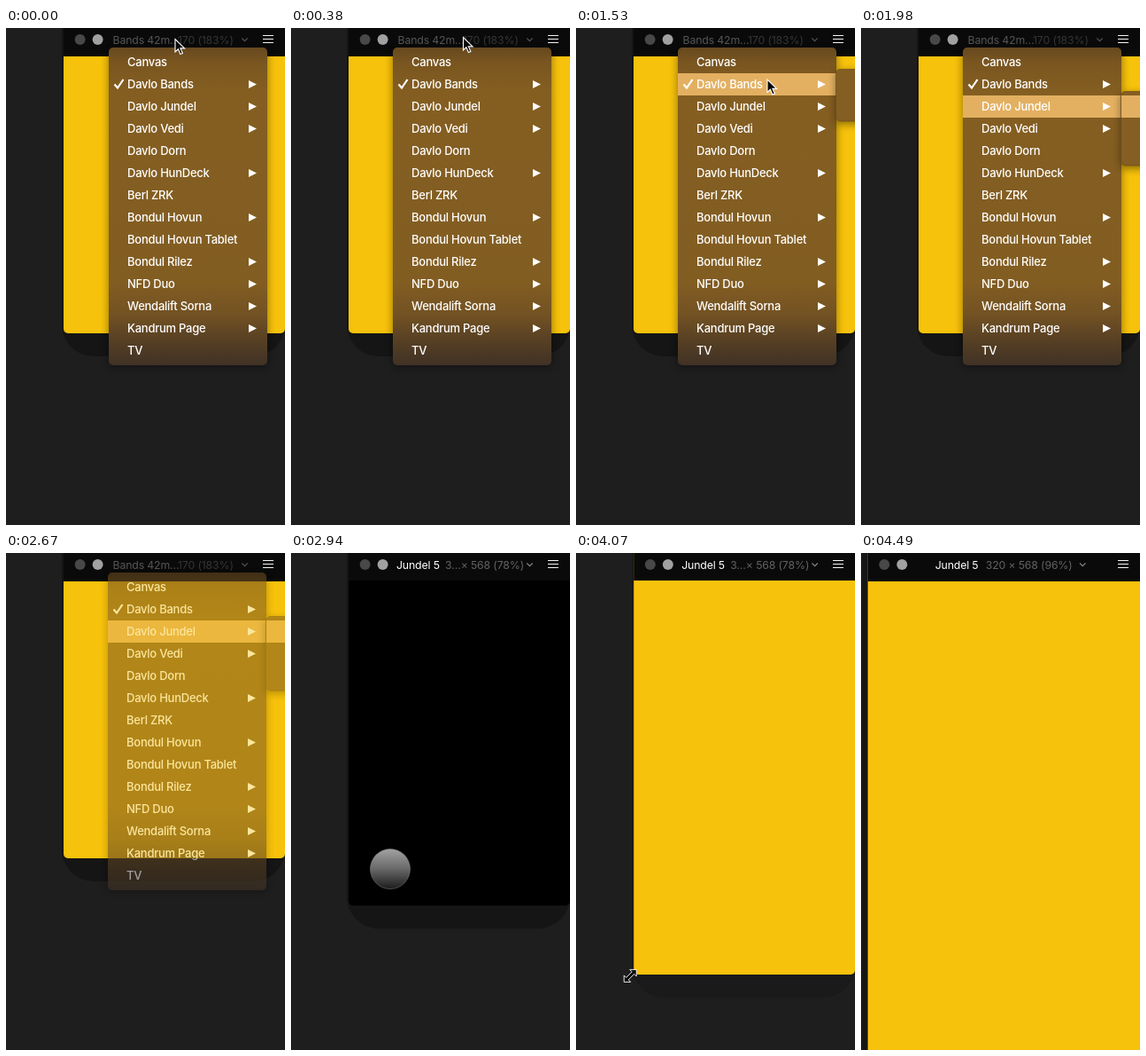
An HTML page that plays this animation: 315x560 px, repeating every 4.82 s.

```html
<!DOCTYPE html>
<html lang="en">
<head>
<meta charset="utf-8">
<title>Device menu</title>
<style>
  html, body { margin: 0; width: 100%; height: 100%; overflow: hidden; background: #1e1e1e; }
  svg { display: block; width: 100%; height: 100%; }
  text { font-family: Inter, Roboto, sans-serif; white-space: pre; }
  .item { font-size: 13px; font-weight: 500; letter-spacing: -.25px; fill: #fff; }
  .head { font-size: 12.3px; letter-spacing: -.15px; }
</style>
</head>
<body>
<svg viewBox="0 0 315 560">
  <defs>
    <linearGradient id="glass" gradientUnits="userSpaceOnUse" x1="0" y1="22" x2="0" y2="380">
      <stop offset="0" stop-color="#67491f"/>
      <stop offset=".05" stop-color="#7a5620"/>
      <stop offset=".14" stop-color="#845e21"/>
      <stop offset=".74" stop-color="#825d22"/>
      <stop offset=".84" stop-color="#735223"/>
      <stop offset=".92" stop-color="#574024"/>
      <stop offset="1" stop-color="#403225"/>
    </linearGradient>
    <linearGradient id="ball" x1="0" y1="0" x2="0" y2="1">
      <stop offset="0" stop-color="#a2a2a2"/>
      <stop offset=".5" stop-color="#686868"/>
      <stop offset="1" stop-color="#1c1c1c"/>
    </linearGradient>
    <filter id="blur" x="-20%" y="-20%" width="140%" height="140%"><feGaussianBlur stdDeviation="4"/></filter>
  </defs>

  <rect width="315" height="560" fill="#1e1e1e"/>
  <rect id="shade" y="-60" rx="36" fill="#141414"/>
  <rect id="page" y="-20" rx="5"/>
  <circle id="dot" cx="112" cy="356" r="22.5" fill="url(#ball)" stroke="#8a8a8a" stroke-opacity=".5"/>
  <rect id="bar" y="-20" fill="#0a0a0a"/>
  <circle id="btnA" cy="13" r="6" fill="#484848"/>
  <circle id="btnB" cy="13" r="6"/>
  <text id="name" class="head" y="17.5"></text>
  <text id="size" class="head" y="17.5"></text>
  <path id="chevron" d="M-3.2 11.5l3.2 3.2 3.2-3.2" fill="none" stroke-width="1.2"/>
  <path d="M290 8.5h12M290 12.5h12M290 16.5h12" stroke="#f4f4f4" stroke-width="1.2"/>

  <g id="menu">
    <rect x="114" y="25" width="181" height="357" rx="6" fill="#000" opacity=".36" filter="url(#blur)"/>
    <rect x="115" y="22" width="179" height="358" rx="5" fill="url(#glass)"/>
    <rect id="pick" x="115" width="179" height="25"/>
    <g id="items"></g>
    <path d="M121.5 63.5l3.5 4 6.5-9.5" fill="none" stroke="#fff" stroke-width="2.2"/>
    <g id="sub">
      <rect id="subShade" x="293" width="60" rx="6" fill="#000" opacity=".4" filter="url(#blur)"/>
      <rect id="subBox" x="293.5" width="60" rx="5" fill="#845e22" stroke="#6c4c1c" stroke-width=".7"/>
      <rect id="subPick" x="294" y="76" width="60" height="25" fill="#e3b061"/>
    </g>
  </g>

  <path id="arrow" d="M0 0v14.5l3.4-3.2 2.5 5.7 2.5-1.1-2.5-5.5h4.700z" fill="#080808" stroke="#fff" stroke-width="1.1"/>
  <path id="resize" d="M7 -7v7.5l-2.5-2.5-6.5 6.5 2.5 2.5h-7.5v-7.5l2.5 2.5 6.5-6.5-2.5-2.5z"
    fill="#080808" stroke="#fff" stroke-width=".9"/>
</svg>
<script>
const LOOP = 4820;
const PHONE_AT = 2860;
const LOADED_AT = 3200;
const labels = ['Canvas', 'Davlo Bands>', 'Davlo Jundel>', 'Davlo Vedi>', 'Davlo Dorn',
  'Davlo HunDeck>', 'Berl ZRK', 'Bondul Hovun>', 'Bondul Hovun Tablet', 'Bondul Rilez>',
  'NFD Duo>', 'Wendalift Sorna>', 'Kandrum Page>', 'TV'];

const el = {};
document.querySelectorAll('[id]').forEach(n => el[n.id] = n);
const set = (node, attrs) => { for (const k in attrs) node.setAttribute(k, attrs[k]); };
const show = (node, on) => set(node, { visibility: on ? 'visible' : 'hidden' });
const move = (node, x, y) => set(node, { transform: `translate(${x} ${y})` });
const lerp = (a, b, k) => a + (b - a) * k;
const ramp = (t, a, b) => Math.min(1, Math.max(0, (t - a) / (b - a)));
const ease = k => k * k * (3 - 2 * k);

// A trailing ">" marks an item with a submenu
el.items.innerHTML = labels.map((s, i) => {
  const y = 38.5 + 25 * i;
  const more = s.endsWith('>') ? `<path d="M273 ${y - 4.5}l9 4.5-9 4.5z" fill="#fff"/>` : '';
  return `<text class="item" x="136" y="${y + 4.5}">${s.replace('>', '')}</text>${more}`;
}).join('');

// Pointer stops: time, x, y
const stops = [
  [20, 191, 12.5], [170, 191.5, 12], [350, 191.5, 12], [380, 194.5, 10.5], [1040, 194.5, 10.5],
  [1380, 216, 58], [1530, 216, 58], [1720, 236, 84], [1960, 326, 88], [3120, 326, 250],
  [3320, 91.5, 489], [3400, 84, 497], [3520, 76, 480], [3540, 76, 480], [3800, 62, 475]
];

function pointer(t) {
  const i = stops.findIndex(s => s[0] > t);
  if (i === 0) return stops[0].slice(1);
  if (i < 0) return stops[stops.length - 1].slice(1);
  const [t0, x0, y0] = stops[i - 1], [t1, x1, y1] = stops[i];
  const k = ease(ramp(t, t0, t1));
  return [lerp(x0, x1, k), lerp(y0, y1, k)];
}

function drawWindow(t, drag) {
  const phone = t >= PHONE_AT;
  const loaded = t >= LOADED_AT;
  const left = lerp(t >= 3000 ? 66 : 65, 7.7, drag);
  const top = phone ? lerp(31, 32, drag) : 32;
  const width = 315 - left;
  const scale = width / 320;
  const bottom = loaded ? top + .5 + 568 * scale
    : lerp(344, 474, phone ? ease(ramp(t, 2840, 3070)) : 0);

  const blurred = t >= 3050 && t < 3620;
  const spread = 2 + 4 * drag;
  set(el.shade, { x: left - spread, width: width + spread, height: bottom + 86,
    opacity: t >= 3050 ? lerp(.4, .8, drag) : .9 });
  set(el.page, { x: left, width, height: bottom + 20, fill: phone && !loaded ? '#000' : '#f7c20b' });
  set(el.bar, { x: left, width, height: top + 20 });
  show(el.dot, phone && t < 3060);

  const bx = left + 18.6;
  set(el.btnA, { cx: bx });
  set(el.btnB, { cx: bx + 20, fill: blurred ? '#484848' : '#a1a1a1' });

  const wide = left < 52;
  let nameX = 120.5, sizeX = 194, arrowX = 269.5;
  if (phone) {
    nameX = wide ? 80 + .48 * left : left + 54;
    sizeX = nameX + (wide ? 57 : 55);
    arrowX = wide ? nameX + 166.5 : left + 204.5;
  }
  const dims = (wide ? '320 ' : '3…') + `× 568 (${Math.round(scale * 100)}%)`;
  el.name.textContent = phone ? 'Jundel 5' : 'Bands 42m…';
  el.size.textContent = phone ? dims : '170 (183%)';
  set(el.name, { x: nameX, fill: phone ? '#fff' : '#565656' });
  set(el.size, { x: sizeX, fill: phone ? '#626262' : '#353535' });
  set(el.chevron, { stroke: phone ? '#858585' : '#505050' });
  move(el.chevron, arrowX, 0);
}

function drawMenu(t, y) {
  const alpha = 1 - ramp(t, 2600, 2775);
  show(el.menu, alpha > 0);
  set(el.menu, { opacity: alpha });
  move(el.menu, 1 - ramp(t, 20, 170), 0);

  const row = t >= 1960 ? 2 : Math.min(2, Math.max(0, Math.floor((y - 26) / 25)));
  set(el.pick, { y: 26 + 25 * row, fill: row ? '#e3b061' : '#cfa05f', opacity: t >= 1040 ? 1 : 0 });

  const first = t >= 1290 && t < 1640;
  const second = t >= 1780;
  const subY = second ? 71.5 : 46.5, subH = second ? 83.5 : 58.5;
  set(el.sub, { opacity: first || second ? 1 : 0 });
  set(el.subShade, { y: subY + 2, height: subH + 2 });
  set(el.subBox, { y: subY, height: subH });
  const blink = t >= 2460 && t < 2530;
  set(el.subPick, { opacity: t >= 1900 && !blink ? 1 : 0 });
}

function draw(t) {
  const drag = ease(ramp(t, 4040, 4490));
  const [x, y] = pointer(t);
  drawWindow(t, drag);
  drawMenu(t, y);

  const atEdge = t >= 3700;
  show(el.arrow, !atEdge);
  show(el.resize, atEdge);
  move(el.arrow, x, y);
  move(el.resize, x - 58 * drag, y + 104 * drag);
}

const start = performance.now();
function tick() {
  draw((performance.now() - start) % LOOP);
  requestAnimationFrame(tick);
}
tick();
</script>
</body>
</html>
```
